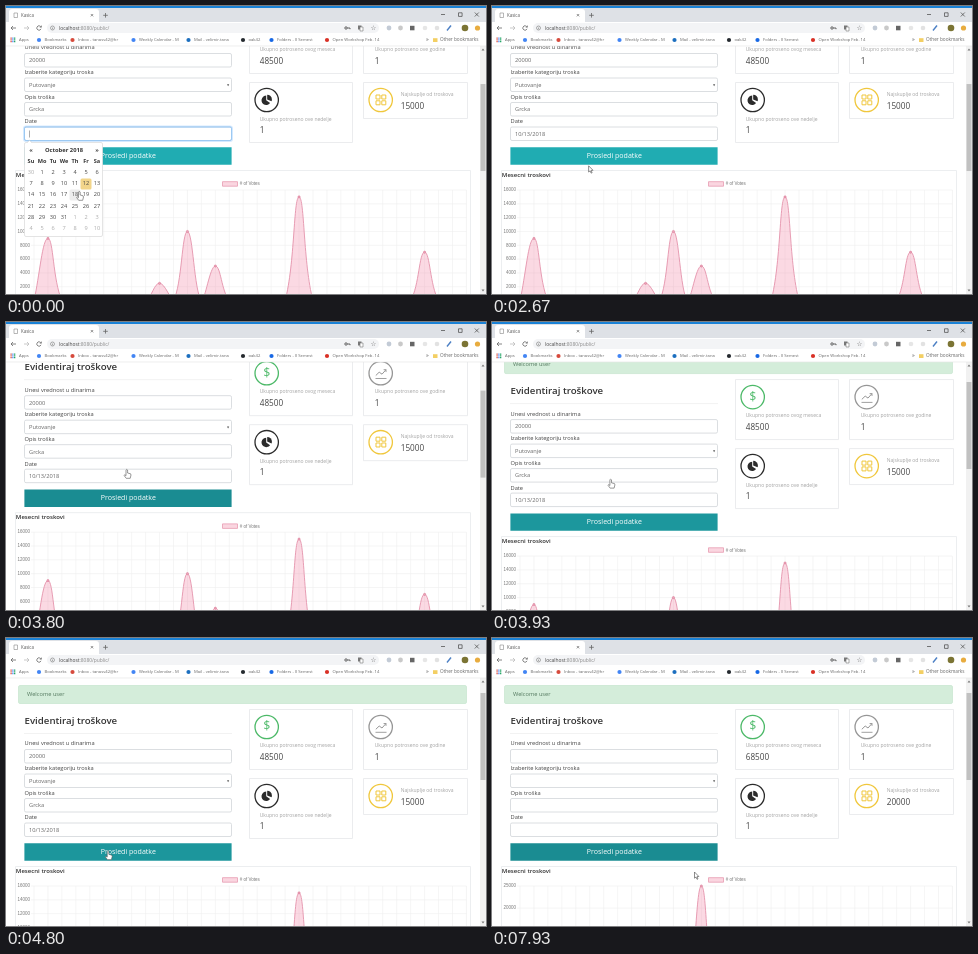
Animation of 480x288 px, one loop 8 s. Source, as an HTML page with a canvas:

```html
<!DOCTYPE html>
<html lang="sr">
<head>
<meta charset="utf-8">
<title>Kasica</title>
<style>
  html, body { margin: 0; width: 480px; height: 288px; overflow: hidden; background: #fff; }
  canvas { display: block; }
</style>
</head>
<body>
<canvas id="stage" width="480" height="288"></canvas>
<script>
const ctx = document.getElementById('stage').getContext('2d');
const LOOP = 8000;
const SANS = '"Open Sans", sans-serif';
const ARIAL = '"Liberation Sans", Arial, sans-serif';
const SYMBOLS = '"DejaVu Sans", sans-serif';

const PICKED = 1730, CLEARED = 5130, UPDATED = 6270, GROWTH_START = 6300;

// Keyframes: [time, value, ...]; values hold before the first and after the last.
const SCROLL = [[3700, 64], [3800, 38], [3930, 14], [4080, 0]];
const HOVER = [[2680, 0], [2830, 1], [3880, 1], [4030, 0], [4700, 0], [4850, 1]];
const FOCUS = [[1510, 1], [1660, 0]];
const POINTER = [
  [270, 73.5, 185], [530, 83, 177], [1070, 83, 177], [1270, 92, 176],
  [2500, 92, 176], [2870, 102, 141], [3440, 102, 141], [3470, 153, 143],
  [3530, 121, 147], [3860, 121, 147], [4200, 111, 194], [4530, 111, 194],
  [4870, 100, 217], [7925, 100, 217], [7930, 202.5, 234]
];

function track(keys, t) {
  const next = keys.findIndex(k => k[0] > t);
  if (next === 0) return keys[0].slice(1);
  if (next < 0) return keys[keys.length - 1].slice(1);
  const a = keys[next - 1], b = keys[next];
  const p = (t - a[0]) / (b[0] - a[0]);
  return a.slice(1).map((v, i) => v + (b[i + 1] - v) * p);
}

function text(str, x, y, size, color = '#444', { weight = 400, align = 'left', font = SANS } = {}) {
  ctx.font = `${weight} ${size}px ${font}`;
  ctx.textAlign = align;
  ctx.textBaseline = 'middle';
  ctx.fillStyle = color;
  ctx.fillText(str, x, y);
}

function box(x, y, w, h, fill, stroke, radius = 0, width = 0.8) {
  ctx.beginPath();
  ctx.roundRect(x, y, w, h, radius);
  paint(fill, stroke, width);
}

function disc(x, y, r, fill, stroke, width = 1) {
  ctx.beginPath();
  ctx.arc(x, y, r, 0, Math.PI * 2);
  paint(fill, stroke, width);
}

function shape(points, fill, stroke, width = 1, closed = true) {
  ctx.beginPath();
  points.forEach(([x, y]) => ctx.lineTo(x, y));
  if (closed) ctx.closePath();
  paint(fill, stroke, width);
}

function line(points, color, width = 0.8) {
  shape(points, null, color, width, false);
}

function paint(fill, stroke, width) {
  if (fill) { ctx.fillStyle = fill; ctx.fill(); }
  if (stroke) { ctx.strokeStyle = stroke; ctx.lineWidth = width; ctx.stroke(); }
}

function mix(a, b, p) {
  return `rgb(${a.map((v, i) => Math.round(v + (b[i] - v) * p))})`;
}

function drawTabs() {
  box(0, 0, 480, 16, '#dee1e6');
  box(0, 0, 480, 2, '#1a82d6');
  box(3, 3, 90, 14, '#fff', null, [3, 3, 0, 0]);
  box(8, 7, 3.5, 4.5, '#fff', '#888', 0, 0.6);
  text('Kasica', 15, 9.5, 4.4, '#555');
  line([[84.8, 8], [87.2, 10.4]], '#666', 0.7);
  line([[87.2, 8], [84.8, 10.4]], '#666', 0.7);
  line([[97.2, 9.3], [101.8, 9.3]], '#666');
  line([[99.5, 7], [99.5, 11.6]], '#666');
  line([[435, 8.5], [439, 8.5]], '#444', 0.7);
  box(452.5, 6.8, 3.6, 3.6, null, '#444', 0, 0.7);
  line([[468.8, 6.5], [472.8, 10.5]], '#444', 0.7);
  line([[472.8, 6.5], [468.8, 10.5]], '#444', 0.7);
}

function drawToolbar() {
  box(0, 16, 480, 24, '#fff');
  line([[10, 22], [5, 22]], '#666');
  line([[7, 20], [5, 22], [7, 24]], '#666');
  line([[18, 22], [23, 22]], '#bbb');
  line([[21, 20], [23, 22], [21, 24]], '#bbb');
  ctx.beginPath();
  ctx.arc(33, 22, 2.2, 0.4, 5.6);
  paint(null, '#666', 0.8);
  shape([[33.5, 21.5], [35.7, 21.5], [35.7, 19.3]], '#666');

  box(41, 17, 332, 10, '#f3f4f6', null, 5);
  disc(46.5, 22, 2, null, '#777', 0.6);
  line([[46.5, 21.5], [46.5, 23.2]], '#777', 0.6);
  text('localhost', 53, 22.3, 4.9, '#444');
  const hostWidth = ctx.measureText('localhost').width;
  text(':8080/public/', 53 + hostWidth, 22.3, 4.9, '#888');
  disc(340, 22, 1.2, null, '#555', 0.9);
  line([[341.2, 22], [344, 22], [344, 23.2]], '#555', 0.9);
  box(352, 19.5, 3.5, 4, '#777');
  box(354, 21, 3, 4, '#fff', '#777', 0, 0.6);
  text('☆', 367.5, 22.2, 6.5, '#666', { align: 'center', font: SYMBOLS });

  disc(383, 22, 2.4, '#c3cbd6');
  disc(394.5, 22, 2.4, '#c9c9c9');
  box(404, 19.8, 4.5, 4.5, '#666');
  disc(419, 22, 2.3, '#e6e6e6');
  disc(431, 22, 2.3, '#e2e2e2');
  line([[441, 24.5], [445, 19.5]], '#4b7fc4', 1.4);
  disc(459, 22, 3.3, '#7b7434');
  disc(471.5, 22, 2.6, '#e8ac3f');
}

function drawBookmarks() {
  for (let i = 0; i < 9; i++) {
    box(4.5 + (i % 3) * 1.8, 31.5 + Math.floor(i / 3) * 1.8, 1.2, 1.2,
      ['#db4437', '#4285f4', '#0f9d58'][i % 3]);
  }
  const items = [
    ['Apps', 13], ['Bookmarks', 38.5, '#4285f4'], ['Inbox - tanasv42@hr', 72, '#d64a3c'],
    ['Weekly Calendar - M', 133, '#4285f4'], ['Mail - velimir.tana', 188, '#1c6fbf'],
    ['oak42', 242.5, '#24292e'], ['Folders - II Semest', 271, '#1768e5'],
    ['Open Workshop Feb. 14', 326.5, '#d93025']
  ];
  for (const [label, x, color] of items) {
    if (color) disc(x - 5.5, 34, 2.1, color);
    text(label, x, 34.2, 4.2, '#666');
  }
  text('»', 420, 33.5, 5.5, '#555');
  box(427, 32.2, 4.5, 3.8, '#f3cf63');
  text('Other bookmarks', 434, 34.2, 4.7, '#666');
  line([[0, 40], [480, 40]], '#e3e3e3', 0.6);
}

function drawScrollbar(scroll) {
  box(474, 40, 6, 248, '#f1f1f1');
  box(474.5, 55 + scroll * 0.36, 5, 87, '#c1c1c1');
  shape([[475.5, 44.5], [477, 42.5], [478.5, 44.5]], '#777');
  shape([[475.5, 283.5], [477, 285.5], [478.5, 283.5]], '#777');
}

function drawForm(t) {
  box(12.5, 47.5, 448, 18, '#d4edda', '#cbe7d2', 1.5);
  text('Welcome user', 21, 56.3, 5.7, '#54795f');
  text('Evidentiraj troškove', 18.5, 83.4, 9.7, '#333', { weight: 600 });
  line([[18, 95.5], [226, 95.5]], '#efefef');

  const filled = t < CLEARED;
  const fields = [
    ['Unesi vrednost u dinarima', 106, '20000'], ['Izaberite kategoriju troska', 130.8, 'Putovanje'],
    ['Opis troška', 155.5, 'Grcka'], ['Date', 180, t < PICKED ? '' : '10/13/2018']
  ];
  fields.forEach(([label, y, value], i) => {
    const top = [111.5, 136, 160.5, 185][i];
    text(label, 18.5, y, 5.7);
    box(18.5, top, 207, 13.5, '#fff', '#d2d6da', 1.5);
    if (filled) text(value, 23, top + 7.4, 5.7, '#666');
  });
  shape([[221, 142.2], [223.2, 142.2], [222.1, 144.2]], '#555');

  const [focus] = track(FOCUS, t);
  if (focus > 0) {
    ctx.globalAlpha = focus;
    box(18, 184.5, 208, 14.5, null, 'rgba(0,123,255,.17)', 2, 2);
    box(18.5, 185, 207, 13.5, null, '#96c8f5', 1.5);
    ctx.globalAlpha = 1;
    if (t < 1530 && t % 1060 < 530) line([[23.5, 188.5], [23.5, 195.5]], '#777', 0.6);
  }

  const [hover] = track(HOVER, t);
  box(18.4, 205.3, 207.2, 17.4, mix([32, 172, 178], [26, 140, 146], hover));
  text('Prosledi podatke', 122.3, 214.4, 7.05, '#fff', { align: 'center' });
}

function drawStats(t) {
  const updated = t >= UPDATED;
  const card = (x, y, w, h, color) => {
    box(x + 0.5, y + 0.5, w, h, '#fff', '#e6e8ea');
    disc(x + 17.7, y + 18, 11.7, null, color, 1.3);
  };
  const caption = (label, value, x, y) => {
    text(label, x, y, 5, '#a3a3a3');
    text(value, x, y + 11.7, 8.2);
  };

  card(243, 71, 103, 60, '#4cb968');
  text('$', 260.7, 89.2, 12.5, '#4cb968', { align: 'center' });
  caption('Ukupno potroseno ovog meseca', updated ? '68500' : '48500', 253.7, 107.9);

  card(357, 71, 104, 60, '#969696');
  line([[369.5, 94.3], [380.5, 94.3]], '#969696', 0.9);
  line([[369.8, 91.3], [373.2, 88], [376, 90], [380, 85.5]], '#969696', 1);
  line([[377.6, 85.5], [380, 85.5], [380, 87.9]], '#969696', 0.9);
  caption('Ukupno potroseno ove godine', '1', 368.7, 107.9);

  card(243, 140, 103, 60, '#2b2b2b');
  ctx.beginPath();
  ctx.moveTo(260.2, 158.3);
  ctx.arc(260.2, 158.3, 4.7, 0.6, Math.PI * 1.5);
  paint('#2b2b2b');
  ctx.beginPath();
  ctx.moveTo(261.2, 157.4);
  ctx.arc(261.2, 157.4, 4.7, -Math.PI / 2, 0.4);
  paint('#2b2b2b');
  caption('Ukupno potroseno ove nedelje', '1', 253.7, 177.4);

  card(357, 140, 104, 36, '#f0c73c');
  for (const x of [370, 375.8]) {
    for (const y of [153, 158.8]) box(x, y, 4, 4, null, '#f0c73c', 0, 1);
  }
  caption('Najskuplje od troskova', updated ? '20000' : '15000', 394.7, 152.7);
}

function drawChart(t) {
  const left = 28, gap = 13.95, top = 248, base = 358.6, count = 32;
  const updated = t >= UPDATED;
  const max = updated ? 25000 : 16000, step = updated ? 5000 : 2000;
  const growth = updated ? 1 - (1 - Math.min(1, Math.max(0, (t - GROWTH_START) / 1000))) ** 4 : 1;
  const peaks = { 1: 9000, 9: 2500, 11: 10000, 13: updated ? 25000 : 5000, 19: 15000, 28: 7000 };
  const points = Array.from({ length: count }, (_, i) =>
    [left + i * gap, base - (peaks[i] || 0) / max * growth * (base - top)]);
  const right = points[count - 1][0];

  box(9.5, 228.5, 455, 150, '#fff', '#e8eaec');
  text('Mesecni troskovi', 9.8, 233.2, 6.05, '#333', { weight: 600 });
  box(216.5, 239.7, 15, 4.5, '#fad6e0', '#e79cb1');
  text('# of Votes', 233.7, 242.2, 4.5, '#777', { font: ARIAL });

  for (let v = 0; v <= max; v += step) {
    const y = base - v / max * (base - top);
    line([[left - 3, y], [right, y]], '#efefef', 0.6);
    text(String(v), 24, y, 4.5, '#777', { align: 'right', font: ARIAL });
  }
  for (const [x] of points) line([[x, top], [x, base + 3]], '#efefef', 0.6);

  // Smooth line whose handles follow the distance to each neighbour.
  const handles = points.map((p, i) => {
    const a = points[i - 1] || p, b = points[i + 1] || p;
    const da = Math.hypot(p[0] - a[0], p[1] - a[1]), db = Math.hypot(b[0] - p[0], b[1] - p[1]);
    const at = k => [p[0] + k * (b[0] - a[0]),
      Math.min(base, Math.max(top, p[1] + k * (b[1] - a[1])))];
    return [at(-0.4 * da / (da + db)), at(0.4 * db / (da + db))];
  });
  const trace = () => {
    ctx.beginPath();
    ctx.moveTo(...points[0]);
    for (let i = 1; i < count; i++) {
      ctx.bezierCurveTo(...handles[i - 1][1], ...handles[i][0], ...points[i]);
    }
  };
  trace();
  ctx.lineTo(right, base);
  ctx.lineTo(left, base);
  paint('rgba(240,120,155,.28)');
  trace();
  paint(null, '#e594ac', 0.9);
  for (const [x, y] of points) disc(x, y, 1.1, '#e9a3b7', '#de7f9b', 0.6);
}

function drawPicker(t) {
  box(18.5, 200.5, 78, 94, '#fff', '#dedede', 1.5);
  shape([[21, 201], [23.5, 198.5], [26, 201]], '#fff');
  line([[21, 200.5], [23.5, 198.3], [26, 200.5]], '#ccc', 0.6);

  const bold = { weight: 700, align: 'center' };
  text('«', 25, 208, 5.8, '#444', bold);
  text('October 2018', 58, 208.2, 5.8, '#333', bold);
  text('»', 91, 208, 5.8, '#444', bold);
  ['Su', 'Mo', 'Tu', 'We', 'Th', 'Fr', 'Sa'].forEach((day, i) =>
    text(day, 25 + i * 11, 219.6, 5.6, '#333', bold));

  const [px, py] = track(POINTER, t);
  const hovered = Math.floor((px - 19.5) / 11) + 7 * Math.floor((py + 65.5 - 225) / 11.1);
  for (let i = 0; i < 42; i++) {
    const x = 25 + (i % 7) * 11, y = 230.8 + Math.floor(i / 7) * 11.1;
    const inMonth = i >= 1 && i <= 31;
    const day = i < 1 ? 30 : inMonth ? i : i - 31;
    if (i === 12) box(x - 5.5, y - 5.5, 11, 11, i === hovered ? '#efc566' : '#f2d58a', null, 1.5);
    else if (i === hovered) box(x - 5.5, y - 5.5, 11, 11, '#ececec', null, 1.5);
    text(String(day), x, y, 5.6, inMonth ? '#444' : '#aaa', { align: 'center' });
  }
}

function drawPointer(t) {
  const [x, y] = track(POINTER, t);
  const beam = t > 4080 && t < 4680;
  const arrow = (t >= PICKED && t < 2720) || t >= 7930;
  ctx.save();
  ctx.translate(x, y);
  ctx.lineJoin = 'round';
  if (beam) {
    line([[-1.3, -3], [1.3, -3]], '#555', 0.6);
    line([[0, -3], [0, 3]], '#555', 0.7);
    line([[-1.3, 3], [1.3, 3]], '#555', 0.6);
  } else if (arrow) {
    shape([[0, 0], [0, 6.2], [1.5, 5], [2.5, 7.3], [3.5, 6.9], [2.5, 4.6], [4.4, 4.5]],
      '#fff', '#444', 0.6);
  } else {
    shape([[-1, 1], [-0.3, 0.3], [0.6, 1], [0.6, 4], [3.6, 4.8], [4, 6], [3.2, 9.3],
      [-0.8, 9.3], [-2.8, 6.6], [-2.3, 5.7], [-1, 6.7]], '#fff', '#555', 0.6);
  }
  ctx.restore();
}

function draw(t) {
  const [scroll] = track(SCROLL, t);
  box(0, 0, 480, 288, '#fff');
  ctx.save();
  ctx.translate(0, -scroll);
  drawForm(t);
  drawStats(t);
  drawChart(t);
  if (t < PICKED) drawPicker(t);
  ctx.restore();
  drawScrollbar(scroll);
  drawTabs();
  drawToolbar();
  drawBookmarks();
  drawPointer(t);
}

function tick() {
  draw(performance.now() % LOOP);
  requestAnimationFrame(tick);
}
tick();
</script>
</body>
</html>
```
